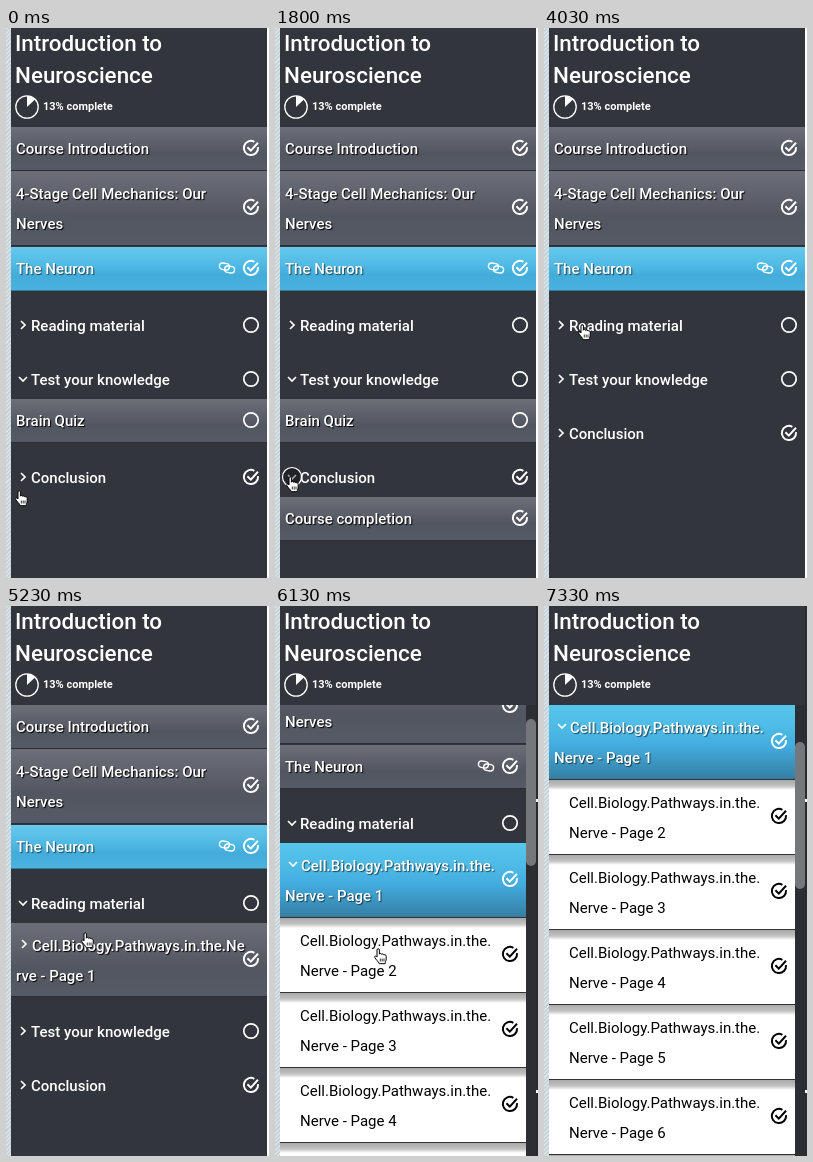
Recreate the animation shown at these times as an HTML page. Size 263 px wide and 550 px high, loop 8680 ms.

```html
<!DOCTYPE html>
<html lang="en">
<head>
<meta charset="utf-8">
<title>Course menu</title>
<style>
html, body { margin: 0; width: 100%; height: 100%; overflow: hidden; }
body { position: relative; background: #fff; color: #fff; font: 500 15px/30px Roboto, "Open Sans", sans-serif; }
#stage { position: absolute; left: 0; top: 0; width: 263px; height: 550px; overflow: hidden;
  background: repeating-linear-gradient(135deg, #d9e3e6 0 1.5px, #c5d2d7 1.5px 3px); }
#edge { position: absolute; left: 261px; top: 0; width: 2px; height: 550px; background: #fff; }
#edge.dark { background: linear-gradient(#fff, #fff) 0 193px / 2px 3px no-repeat,
  linear-gradient(#fff, #fff) 0 484px / 2px 3px no-repeat, #292b30; }
#panel { position: absolute; left: 5px; top: 0; width: 256px; height: 550px; background: #32353c; }
h1 { position: absolute; left: 4px; top: -1px; margin: 0; font-weight: 500; font-size: 22.4px; line-height: 32px; }
#pie { position: absolute; left: 4px; top: 67px; }
#done { position: absolute; left: 32px; top: 64px; font-size: 11px; font-weight: 600; }
#view { position: absolute; left: 0; top: 99px; width: 256px; height: 451px; overflow: hidden; }
#list { width: 256px; }
.nav #list { width: 246px; }
.row, .head, .page { position: relative; box-sizing: border-box; white-space: pre; }
.row { height: 44px; padding: 7px 5px 0; text-shadow: 1px 1px 1px #000;
  background: linear-gradient(#6c6f78, #5c5f69 40%, #525660 60%, #565a66); border-bottom: 1px solid #2c2e35; }
.row.tall { height: 75px; padding-top: 8px; }
.row.on { background: linear-gradient(#66c9ed, #4eb8e4 45%, #43acda 65%, #4ab2dd);
  border-color: #2f7fa4; text-shadow: 1px 1px 1px rgba(0, 0, 0, .6); }
.row.tall.on { background: linear-gradient(#55c6ec, #4ebbe6 30%, #43ade0 55%, #3580a5); }
#neuron { margin-top: 1px; }
#first { height: 74px; text-indent: 16px; }
.head { height: 54px; padding: 20px 0 0 20px; }
.page { height: 75px; padding: 8px 0 0 20px; color: #000; font-weight: 400;
  border-top: 1px solid #333; background: linear-gradient(#a9a9a9, #c2c2c2 6px, #fff 10px); }
.fold { overflow: hidden; }
#pages { display: none; }
.nav #pages { display: block; }
svg { position: absolute; overflow: visible; fill: none; stroke: currentColor; stroke-width: 2; }
.mark { right: 8px; width: 16px; height: 16px; top: 13px; }
.tall .mark, .page .mark { top: 28px; }
.head .mark { top: 26px; }
.link { right: 32px; top: 15px; width: 16px; height: 12px; stroke-width: 1.4; }
.chev { left: 12px; top: 33.5px; width: 1px; height: 1px; stroke-width: 1.7; }
.row .chev { left: 13px; top: 21px; }
.chev path { transform: rotate(-90deg); }
.open > .chev path { transform: none; }
#track, #thumb { display: none; position: absolute; left: 246px; top: 99px; width: 10px; }
#track { height: 451px; background: #2c2e34; }
#thumb { height: 147px; border-radius: 5px; background: #75777b; }
.nav #thumb, .nav #track { display: block; }
#ring, #hand { left: 0; top: 0; width: 14px; height: 17px; transform-origin: 0 0; }
#ring { stroke: #fff; stroke-width: 1.2; fill: rgba(0, 0, 0, .35); }
#hand { stroke: #000; stroke-width: 1; fill: #fff; stroke-linejoin: round; }
</style>
</head>
<body>
<div id="stage">
  <div id="panel">
    <h1>Introduction to<br>Neuroscience</h1>
    <svg id="pie" width="24" height="24"><circle cx="12" cy="12" r="11.2" stroke-width="1.3"/><path d="M12 12V1A11 11 0 0 1 20 4.5Z" fill="#fff" stroke="none"/></svg>
    <div id="done">13% complete</div>
    <div id="view"><div id="list">
      <div class="row" data-mark="check">Course Introduction</div>
      <div class="row tall" data-mark="check">4-Stage Cell Mechanics: Our
Nerves</div>
      <div class="row" id="neuron" data-mark="check">The Neuron<svg class="link" viewBox="0 0 16 12"><rect x=".5" y="1.2" width="10" height="6.4" rx="3.2" transform="rotate(10 5 4)"/><rect x="5.5" y="4.4" width="10" height="6.4" rx="3.2" transform="rotate(10 11 8)"/></svg></div>
      <div class="head" id="reading" data-mark="ring" data-chev>Reading material</div>
      <div class="fold" id="readingFold">
        <div class="row tall" id="first" data-mark="check" data-chev><span id="firstText"></span></div>
        <div id="pages"></div>
      </div>
      <div class="head" id="test" data-mark="ring" data-chev>Test your knowledge</div>
      <div class="fold" id="testFold"><div class="row" data-mark="ring">Brain Quiz</div></div>
      <div class="head" id="end" data-mark="check" data-chev>Conclusion</div>
      <div class="fold" id="endFold"><div class="row" data-mark="check">Course completion</div></div>
    </div></div>
    <div id="track"></div>
    <div id="thumb"></div>
  </div>
  <div id="edge"></div>
  <svg id="ring"><circle r="9.5"/></svg>
  <svg id="hand"><path d="M3 2C3 .2 5.4.2 5.4 2V6.2C5.8 5 7.6 5.2 7.7 6.4 8.2 5.6 9.8 5.9 9.9 7 10.5 6.4 12.2 6.8 12.2 8.2V11C12.2 13 11.2 13.5 11.2 15.7H5.2C5 14 1.6 11.5.7 9.3.4 7.9 2 7.4 3 9Z"/><path d="M6.3 10.5V13.5M8.2 10.5V13.5M10 10.5V13.5" stroke-width=".8"/></svg>
</div>
<script>
const $ = id => document.getElementById(id);
const LOOP = 8680, STEP = 150, NAV = 5830;
const BOOK = 'Cell.Biology.Pathways.in.the.';

const marks = {
  ring: '<circle cx="8" cy="8" r="7.2" stroke-width="1.7"/>',
  check: '<path d="M11.4 1.8A7.1 7.1 0 1 0 15 7.2"/><path d="M4.4 7.2L7.8 10.6L15 2.8"/>'
};

for (let n = 2; n <= 8; n++) {
  $('pages').insertAdjacentHTML('beforeend',
    `<div class="page" data-mark="check">${BOOK}\nNerve - Page ${n}</div>`);
}
document.querySelectorAll('[data-mark]').forEach(el =>
  el.insertAdjacentHTML('beforeend', `<svg class="mark">${marks[el.dataset.mark]}</svg>`));
document.querySelectorAll('[data-chev]').forEach(el =>
  el.insertAdjacentHTML('beforeend', '<svg class="chev"><path d="M-4 -2L0 2L4 -2"/></svg>'));

// Each key is [time, value, ...], with linear runs between
const hand = [
  [0, 13, 462], [150, 16, 454], [300, 17, 449], [1200, 17, 449], [1350, 18, 450],
  [1500, 15, 448], [2380, 15, 448], [2830, 16, 351], [3430, 16, 351], [3880, 89, 300],
  [4030, 38, 296], [4330, 38, 296], [4480, 16, 297], [4930, 16, 297], [5080, 48, 312],
  [5230, 79, 326], [5530, 103, 342], [7030, 103, 342], [7180, 169, 447]
];
const endOpen = [[300, 0], [750, 1], [1800, 1], [2250, 0]];
const testOpen = [[2980, 1], [3430, 0]];
const readOpen = [[4480, 0], [4780, 1]];
const scroll = [[NAV, 0], [5980, 2], [6130, 80], [6280, 192], [6430, 218]];
const clicks = [[300, 17, 449], [1800, 17, 449], [2980, 17, 352], [4480, 17, 298], [5530, 104, 343]];

function at(track, t, i = 1) {
  const n = track.findIndex(k => k[0] > t);
  if (n < 0) return track[track.length - 1][i];
  if (n === 0) return track[0][i];
  const a = track[n - 1], b = track[n];
  return a[i] + (b[i] - a[i]) * (t - a[0]) / (b[0] - a[0]);
}

const swing = k => (1 - Math.cos(Math.PI * k)) / 2;

// Screen refreshes in steps; the grid restarts at 2830 ms
function snap(t) {
  const base = t < 2830 ? 0 : 2830;
  return base + Math.floor((t - base) / STEP) * STEP;
}

function fold(id, height, open, isOpen) {
  $(id + 'Fold').style.height = height * swing(open) + 'px';
  $(id).classList.toggle('open', isOpen);
}

function draw(time) {
  const t = snap(time % LOOP), nav = t >= NAV;
  $('panel').classList.toggle('nav', nav);
  $('neuron').classList.toggle('on', !nav);
  $('first').classList.toggle('on', nav);
  $('first').classList.toggle('open', nav);
  $('firstText').textContent = BOOK + (nav ? '\nNerve' : 'Ne\nrve') + ' - Page 1';
  $('edge').classList.toggle('dark', t >= 6130);

  fold('end', 44, at(endOpen, t), t >= 300 && t < 1950);
  fold('test', 44, at(testOpen, t), t < 2980);
  fold('reading', nav ? 599 : 74, at(readOpen, t), t >= 4480);

  const y = at(scroll, t);
  $('list').style.transform = `translateY(${-y}px)`;
  $('thumb').style.top = 99 + y * .17 + 'px';

  $('hand').style.display = t < 7330 ? '' : 'none';
  $('hand').style.transform = `translate(${at(hand, t, 1) - 4}px, ${at(hand, t, 2)}px)`;

  const hit = clicks.find(c => t >= c[0] && t < c[0] + 2 * STEP);
  $('ring').style.display = hit ? '' : 'none';
  if (hit) {
    const late = t > hit[0];
    $('ring').style.transform = `translate(${hit[1]}px, ${hit[2]}px) scale(${late ? 1.15 : 1})`;
    $('ring').style.opacity = late ? .5 : 1;
  }
}

const start = performance.now();
function tick() {
  draw(performance.now() - start);
  requestAnimationFrame(tick);
}
tick();
</script>
</body>
</html>
```
